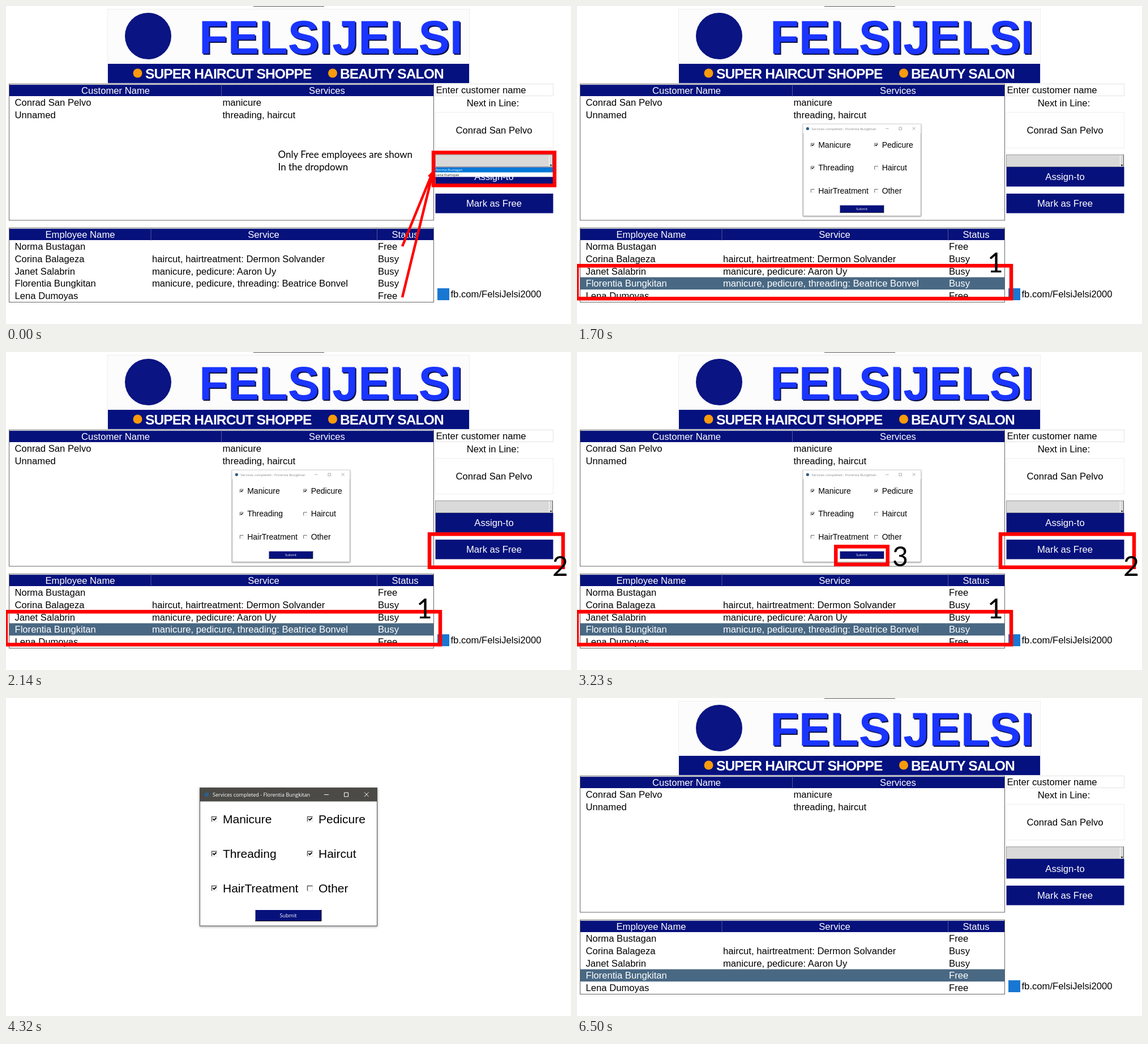
An HTML page for the animation above (7.59 s loop, 998 by 561 pixels).

```html
<!DOCTYPE html>
<html lang="en">
<head>
<meta charset="utf-8">
<title>Salon queue walkthrough</title>
<style>
  html, body { margin: 0; width: 100%; height: 100%; overflow: hidden; background: #fff; }
  svg { display: block; width: 100%; height: 100%; }
  text { font: 16.65px "Liberation Sans", Arial, sans-serif; }
  .brand { font-size: 83px; font-weight: bold; }
  .tagline { font-size: 24.6px; font-weight: bold; letter-spacing: -.9px; }
  .note { font: 17px Lato, sans-serif; }
  .step { font: 48px Lato, sans-serif; }
  .option { font-size: 21px; }
  .small { font: 9.1px "Open Sans", "Noto Sans", sans-serif; }
  .tiny { font: 6px "Open Sans", "Noto Sans", sans-serif; }
  .marker { fill: none; stroke: red; stroke-width: 6.5; }
  .window { filter: drop-shadow(0 1px 2px #0006); }
</style>
</head>
<body>
<svg id="stage" viewBox="0 0 998 561"></svg>
<script>
const NAVY = '#06117c', SELECTED = '#496883', GREY = '#d9d9d9';
const ENDS = [1050, 2140, 3230, 4320, 6500, 7590];
const LOOP = ENDS.at(-1);

const people = {
  next: 'Conrad San Pelvo',
  staff: ['Norma Bustagan', 'Corina Balageza', 'Janet Salabrin', 'Florentia Bungkitan', 'Lena Dumoyas'],
};
const jobs = ['', 'haircut, hairtreatment: Dermon Solvander', 'manicure, pedicure: Aaron Uy',
  'manicure, pedicure, threading: Beatrice Bonvel', ''];

const rect = (x, y, w, h, fill, stroke = 'none') =>
  `<rect x="${x}" y="${y}" width="${w}" height="${h}" fill="${fill}" stroke="${stroke}"/>`;
const path = (d, stroke, width = 1) =>
  `<path d="${d}" fill="none" stroke="${stroke}" stroke-width="${width}"/>`;
const circle = (x, y, r, fill) => `<circle cx="${x}" cy="${y}" r="${r}" fill="${fill}"/>`;
const text = (x, y, words, fill = '#000', style = '') =>
  `<text x="${x}" y="${y}" fill="${fill}" class="${style}">${words}</text>`;
const centered = (x, y, words, fill, style) =>
  `<g text-anchor="middle">${text(x, y, words, fill, style)}</g>`;
const marker = (x, y, w, h) => `<rect class="marker" x="${x}" y="${y}" width="${w}" height="${h}"/>`;
// Content shown only in the listed scenes.
const during = (scenes, ...parts) => `<g data-scenes="${scenes}">${parts.join('')}</g>`;

function banner() {
  return rect(179.5, 5.5, 639, 130, '#fcfcfc', '#eee') + rect(180, 102, 638, 34, '#05117f') +
    circle(251, 53, 41, '#0a1482') +
    text(343, 86, 'FELSIJELSI', '#0a0f45', 'brand') + text(341, 84, 'FELSIJELSI', '#1a35ff', 'brand') +
    circle(232.5, 118.5, 8, '#f99b0c') + text(246, 128, 'SUPER HAIRCUT SHOPPE', '#fff', 'tagline') +
    circle(577, 118.5, 8, '#f99b0c') + text(590, 128, 'BEAUTY SALON', '#fff', 'tagline');
}

function table(top, bottom, dividers, headings) {
  return rect(5.5, top, 750, bottom - top, '#fff', '#666') +
    rect(6, top + 1.5, 749, 20, NAVY) +
    dividers.map(x => path(`M${x} ${top + 1}v21`, '#55598f')).join('') +
    headings.map(([x, words]) => centered(x, top + 17.3, words, '#fff')).join('');
}

function staffRow(i, status, job = jobs[i], fill = '#000') {
  const y = 430.2 + 21.75 * i;
  return text(15.5, y, people.staff[i], fill) + text(258, y, job, fill) + text(657, y, status, fill);
}

const selectedRow = (status, job) => rect(6, 478.5, 749, 21.7, SELECTED) + staffRow(3, status, job, '#fff');

const button = (y, words) => rect(758.5, y, 208, 34.5, NAVY) + centered(862, y + 23, words, '#fff');

function sidebar() {
  return rect(758.5, 137.5, 208, 21, '#fff', '#e3e3e3') + text(759.5, 154.2, 'Enter customer name') +
    centered(860, 176.5, 'Next in Line:') +
    rect(758.5, 187.5, 208, 63, '#fff', '#eee') + centered(862, 225.2, people.next) +
    rect(758.5, 262.5, 207, 21, GREY, '#999') +
    path('M959.5 263v20', '#fff') + path('M965.5 262v22', '#555') +
    '<path d="M960.5 280h4l-2 2.5z"/>' +
    button(284, 'Assign-to') + button(331, 'Mark as Free') +
    rect(762, 498, 21, 21, '#1877d2') + text(785.5, 514, 'fb.com/FelsiJelsi2000');
}

function dropdownNote() {
  return rect(758, 284.5, 208, 17, '#fff') + rect(758, 285, 208, 8.5, '#0078d7') +
    text(759, 291.3, people.staff[0], '#fff', 'tiny') + text(759, 299.5, people.staff[4], '#000', 'tiny') +
    marker(755, 258.5, 214, 58) +
    path('M700 424L752 297M700 514L752 302', 'red', 4.5) +
    '<path d="M757 287L745 300L759 307z" fill="red"/>' +
    text(480.5, 268, 'Only Free employees are shown', '#000', 'note') +
    text(480.5, 290, 'In the dropdown', '#000', 'note');
}

function checkbox(x, y, label, checked) {
  return path(`M${x} ${y + 9.5}h9.5v-9.5`, '#e3e3e3') +
    path(`M${x + .5} ${y + 9}v-8.5h9`, '#555', 1.4) +
    (checked ? path(`M${x + 2.5} ${y + 4}l2 2.5l4 -4`, '#000', 1.8) : '') +
    text(x + 20, y + 12, label, '#000', 'option');
}

function dialog(place, bar, ink, checkedCount, border) {
  const options = ['Manicure', 'Pedicure', 'Threading', 'Haircut', 'HairTreatment', 'Other'];
  return `<g class="window" transform="${place}">` +
    rect(.5, .5, 313, 243.5, '#fff', border) + rect(.5, .5, 313, 24, bar) +
    circle(12.5, 12.5, 4, '#2f5d86') +
    text(23, 16, `Services completed - ${people.staff[3]}`, ink, 'small') +
    path('M220 12.5h8M255.5 9h7v7h-7zM291 8.5l7.5 7.5m0 -7.5l-7.5 7.5', ink) +
    options.map((label, i) =>
      checkbox(i % 2 ? 190 : 21, 51 + 61 * (i >> 1), label, i < checkedCount)).join('') +
    rect(98.5, 216, 116.5, 19.5, NAVY) + path('M98 235.5h117v-20', '#111', 1) +
    centered(156.5, 229, 'Submit', '#fff', 'small') + '</g>';
}

const stage = document.getElementById('stage');
stage.innerHTML =
  during('01235',
    path('M437 .5h125', '#555'), banner(),
    table(137.5, 378, [380.5], [[193.5, 'Customer Name'], [567, 'Services']]),
    text(15.5, 176, people.next), text(382.5, 176, 'manicure'),
    text(15.5, 197.7, 'Unnamed'), text(382.5, 197.7, 'threading, haircut'),
    table(391.5, 522.5, [256, 655.5], [[131, 'Employee Name'], [455, 'Service'], [705, 'Status']]),
    staffRow(0, 'Free'), staffRow(1, 'Busy'), staffRow(2, 'Busy'), staffRow(4, 'Free'),
    sidebar()) +
  during('0', staffRow(3, 'Busy'), dropdownNote()) +
  during('123',
    selectedRow('Busy'), dialog('translate(399 208) scale(.665)', '#fff', '#888', 3, '#888'),
    marker(0, 458.2, 767, 58), centered(739, 470, '1', '#000', 'step')) +
  during('23', marker(748, 321.3, 236, 58.5), centered(979, 395, '2', '#000', 'step')) +
  during('3', marker(457.2, 343.3, 91.5, 31.5), centered(571, 378, '3', '#000', 'step')) +
  during('4', dialog('translate(342 158)', '#4b4a46', '#fff', 5, '#555')) +
  during('5', selectedRow('Free', ''));

const layers = stage.querySelectorAll('[data-scenes]');
const start = performance.now();
function show(now) {
  const time = Math.max(0, now - start) % LOOP;
  const scene = ENDS.findIndex(end => time < end);
  for (const layer of layers) {
    layer.style.display = layer.dataset.scenes.includes(scene) ? '' : 'none';
  }
  requestAnimationFrame(show);
}
show(start);
</script>
</body>
</html>
```
